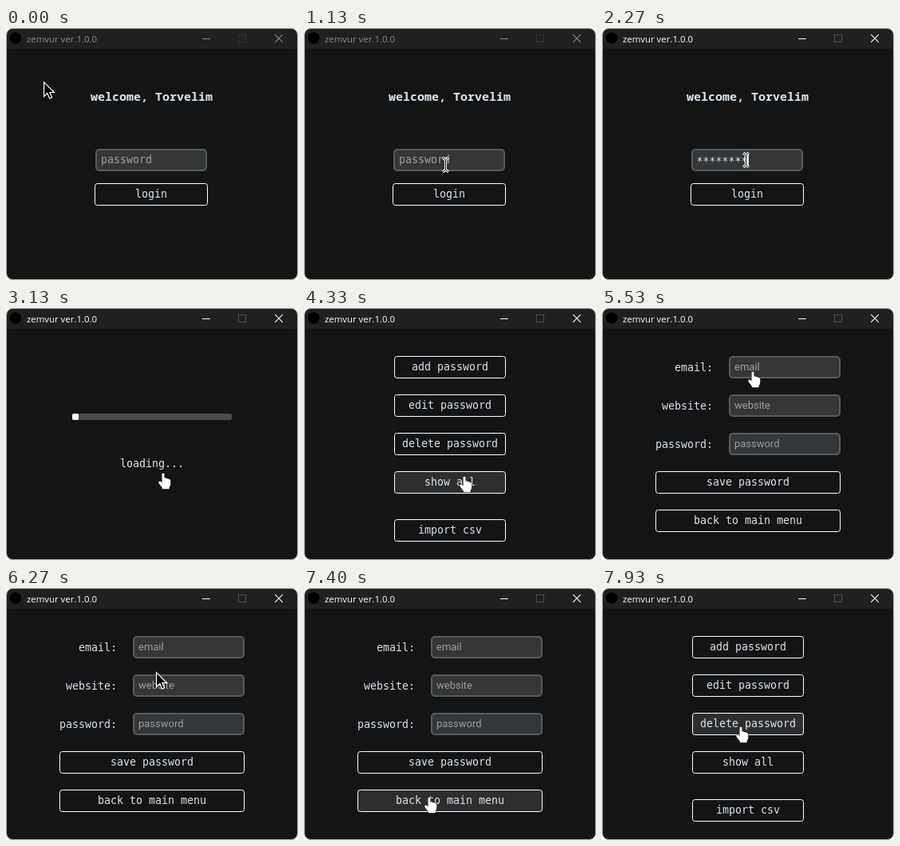
Animation, 366 px wide and 315 px high, one loop 8 s. Source, as an HTML page:

```html
<!DOCTYPE html>
<html lang="en">
<head>
<meta charset="utf-8">
<title>Password manager</title>
<style>
  html, body { margin: 0; width: 100%; height: 100%; overflow: hidden; background: #fff; }
  svg { display: block; width: 366px; height: 315px; }
  text { white-space: pre; }
  .mono { font: 13.3px "DejaVu Sans Mono", "Noto Sans Mono", monospace; fill: #dce4ee; }
  .head { font: 700 15px "Noto Sans Mono", "DejaVu Sans Mono", monospace; }
  .hint { fill: #9e9e9e; }
  .sans { font: 13px Roboto, "Liberation Sans", sans-serif; }
  .title { font: 11.4px "Open Sans", "Noto Sans", sans-serif; }
  .mid { text-anchor: middle; }
  .end { text-anchor: end; }
</style>
</head>
<body>
<svg id="stage" viewBox="0 0 366 315" xmlns="http://www.w3.org/2000/svg">
  <clipPath id="frame"><rect x=".5" y=".5" width="365" height="314" rx="8"/></clipPath>
  <g clip-path="url(#frame)">
    <rect width="366" height="315" fill="#202020"/>
    <rect x="1" y="26" width="364" height="300" rx="4" fill="#141414"/>
  </g>
  <rect x=".5" y=".5" width="365" height="314" rx="8" fill="none" stroke="#b4b4b4"/>
  <circle cx="12" cy="12.5" r="7.3" fill="#000"/>
  <g id="chrome">
    <text class="title" x="26" y="18" fill="currentColor">zemvur ver.1.0.0</text>
    <path d="M246 13.5h10M337.2 8.2l9.6 9.6M346.8 8.2l-9.6 9.6" fill="none" stroke="currentColor" stroke-width="1.1"/>
    <rect id="maximize" x="291.5" y="8.5" width="9" height="9" fill="none"/>
  </g>
  <g id="pages"></g>
  <g id="pointer">
    <path id="arrow" d="M.6 .6V18.5L4.8 14.5L7.6 21L10.6 19.7L7.9 13.5H13.4Z" fill="#000" stroke="#fff" stroke-width="1.2"/>
    <g id="beam" fill="none" transform="translate(.5 0)">
      <path d="M-3.5 -9L0 -6V6L-3.5 9M3.5 -9L0 -6V6L3.5 9" stroke="#fff" stroke-width="3"/>
      <path d="M-3.5 -9L0 -6V6L-3.5 9M3.5 -9L0 -6V6L3.5 9" stroke="#000"/>
    </g>
    <g id="hand">
      <path d="M-1.5 0Q0 -1.2 1.5 0V5.6Q3.2 4.8 4.3 6.2Q6 5.4 7 7Q9 6.6 9.3 8.8V13Q9.2 15.5 7.6 17.2V19.3H-1.2V17.5L-5.4 12.2Q-6.3 10 -4.2 9.6Q-2.8 9.8 -1.5 11.5Z" fill="#fff" stroke="#000" paint-order="stroke"/>
    </g>
  </g>
</svg>
<script>
const LOOP = 8000, STEP = 1000 / 15;
const $ = id => document.getElementById(id);

function add(parent, tag, attrs, text) {
  const node = document.createElementNS("http://www.w3.org/2000/svg", tag);
  for (const key in attrs) node.setAttribute(key, attrs[key]);
  if (text) node.textContent = text;
  return parent.appendChild(node);
}

function makePage() {
  return { node: add($("pages"), "g", {}), zones: [] };
}

const label = (page, x, y, text, cls = "mid") =>
  add(page.node, "text", { x, y, class: "mono " + cls }, text);

function button(page, x, y, w, text) {
  const box = add(page.node, "rect", { x: x + .5, y: y + .5, width: w - 1, height: 27, rx: 3, stroke: "#fff" });
  label(page, x + w / 2, y + 18, text);
  page.zones.push({ x, y, w, box, kind: "hand" });
}

function entry(page, x, y, hint, cls) {
  add(page.node, "rect", { x: x + 1, y: y + 1, width: 138, height: 26, rx: 4, fill: "#343638", stroke: "#565b5e", "stroke-width": 2 });
  page.zones.push({ x, y, w: 140, kind: "beam" });
  return add(page.node, "text", { x: x + 7, y: y + 18, class: cls + " hint" }, hint);
}

const login = makePage();
label(login, 182.5, 91, "welcome, Torvelim", "head mid");
const hint = entry(login, 112, 151, "password", "mono");
const secret = label(login, 118.5, 171, "********", "");
const caret = add(login.node, "rect", { y: 155, width: 2, height: 18, fill: "#dce4ee" });
button(login, 111, 194, 142, "login");

const loading = makePage();
add(loading.node, "rect", { x: 83, y: 132, width: 200, height: 8, rx: 2, fill: "#4a4d50" });
const bar = add(loading.node, "rect", { x: 83, y: 132, height: 8, rx: 2, fill: "#fff" });
label(loading, 183, 199, "loading...");

const menu = makePage();
["add password", "edit password", "delete password", "show all", "import csv"]
  .forEach((text, i) => button(menu, 113, i < 4 ? 60 + 48 * i : 264, 140, text));

const form = makePage();
["email", "website", "password"].forEach((name, i) => {
  label(form, 139, 79 + 48 * i, name + ":", "end");
  entry(form, 159, 60 + 48 * i, name, "sans");
});
button(form, 67, 204, 232, "save password");
button(form, 67, 252, 232, "back to main menu");

const pages = [login, loading, menu, form];
const schedule = [[0, login], [47, loading], [60, menu], [83, form], [112, menu]];

// Pointer stops: step, x, y and whether the way there is eased
const stops = [
  [0, 47, 67], [8, 175, 171, true], [16, 175, 171], [17, 177, 171], [18, 180, 165],
  [38, 180, 165], [44, 197, 207, true], [59, 197, 207], [64, 203, 212], [69, 192, 208],
  [72, 192, 208], [75, 188, 145], [80, 189, 80], [91, 189, 80], [94, 188, 105],
  [104, 160, 249], [108, 157, 262], [114, 157, 262], [119, 174, 174]
];

function pointerAt(n) {
  const i = stops.findIndex(stop => stop[0] >= n);
  if (i < 1) return stops[0].slice(1, 3);
  const [n0, x0, y0] = stops[i - 1], [n1, x1, y1, eased] = stops[i];
  let k = (n - n0) / (n1 - n0);
  if (eased) k = k * k * (3 - 2 * k);
  return [x0 + (x1 - x0) * k, y0 + (y1 - y0) * k];
}

const show = (node, on) => node.setAttribute("display", on ? "inline" : "none");

function draw(time) {
  const n = Math.min(119, Math.floor((time % LOOP + 4) / STEP));
  const [since, page] = schedule.filter(item => item[0] <= n).pop();
  const [x, y] = pointerAt(n);
  pages.forEach(p => show(p.node, p === page));

  const focused = n >= 21;
  $("chrome").setAttribute("color", focused ? "#fff" : "#8a8a8a");
  $("maximize").setAttribute("stroke", focused ? "#4c4c4c" : "#363636");

  const typed = n >= 32;
  show(hint, !focused);
  show(secret, typed);
  show(caret, (n >= 21 && n < 30) || (n >= 34 && n < 43));
  caret.setAttribute("x", typed ? 182 : 118);
  bar.setAttribute("width", Math.max(8, Math.min(200, 8 + 16 * (n - 47))));

  const over = page.zones.find(z => x >= z.x && x < z.x + z.w && y >= z.y && y < z.y + 28);
  page.zones.forEach(z => z.box && z.box.setAttribute("fill", z === over ? "#2e2e2e" : "#141414"));

  // The pointer keeps its shape for one step after a page change
  const stale = page === loading || (since > 0 && n === since);
  const kind = stale ? "hand" : over ? over.kind : "arrow";
  ["arrow", "beam", "hand"].forEach(id => show($(id), id === kind));
  $("pointer").setAttribute("transform", `translate(${Math.round(x)} ${Math.round(y)})`);
}

const start = performance.now();
function tick() {
  draw(performance.now() - start);
  requestAnimationFrame(tick);
}
tick();
</script>
</body>
</html>
```
